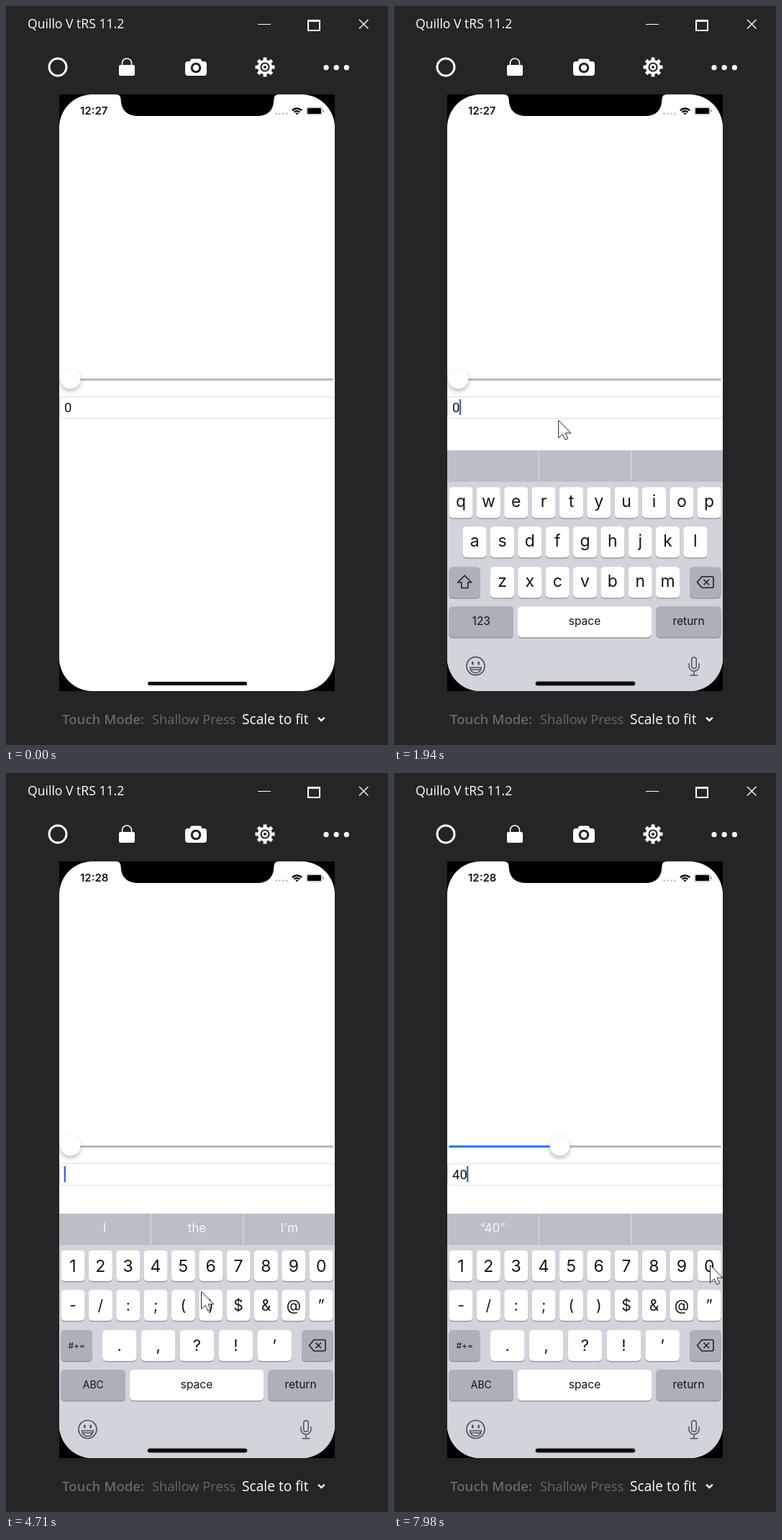
An HTML page with a canvas that plays this animation: 531x1028 px, repeating every 8 s.

```html
<!DOCTYPE html>
<html lang="en">
<head>
<meta charset="utf-8">
<title>Simulator</title>
<style>
html, body { margin: 0; width: 100%; height: 100%; overflow: hidden; background: #252525; }
canvas { display: block; }
</style>
</head>
<body>
<canvas id="stage" width="531" height="1028"></canvas>
<script>
const c = document.getElementById('stage').getContext('2d');
const LOOP = 8000, STEP = 77.3, KEYBOARD = 1594, DIGITS = 2940, DELETE = 4200, FOUR = 6610, ZERO = 7730;
const UI = '"Open Sans", sans-serif', PHONE = 'Inter, sans-serif', FIELD = 'Roboto, sans-serif';
const INK = '#151515', DARK = '#252525', GREY_KEY = '#abb0ba', ICON = '#50545a';
const PITCH = 38.35;

// Pointer moves: start, end, destination
const moves = [[245, 850, 234, 564], [1860, 2400, 123, 792], [2410, 2710, 120, 844],
  [3220, 3745, 432, 796], [4400, 4940, 184, 680], [5400, 5800, 221, 689], [6660, 7273, 439, 684]];

const clamp = u => Math.min(1, Math.max(0, u));
const smooth = u => (1 - Math.cos(Math.PI * clamp(u))) / 2;

const snap = t => 1630 + STEP * Math.floor((t - 1630) / STEP + 0.2);

function pointerAt(t) {
  let x = 435, y = 990;
  for (const [a, b, toX, toY] of moves) {
    const u = smooth((t - a) / (b - a));
    x += (toX - x) * u;
    y += (toY - y) * u;
  }
  return [x, y];
}

// Solid for a while after each touch, then blinking with soft fades
function caretAlpha(t) {
  if (t < KEYBOARD) return 0;
  const touch = [1250, DIGITS, DELETE, FOUR, ZERO].findLast(a => a <= t);
  const idle = t - touch - 800;
  if (idle < 0) return 1;
  const p = idle % 1020;
  return clamp(1 - p / 230) + clamp((p - 390) / 230);
}

function box(x, y, w, h, r, fill) {
  c.beginPath();
  c.roundRect(x, y, w, h, r);
  c.fillStyle = fill;
  c.fill();
}
function disc(x, y, r, fill) {
  c.beginPath();
  c.arc(x, y, r, 0, 7);
  c.fillStyle = fill;
  c.fill();
}
function stroke(width, color) {
  c.lineWidth = width;
  c.strokeStyle = color;
  c.stroke();
}
function ring(x, y, r, width, color) {
  c.beginPath();
  c.arc(x, y, r, 0, 7);
  stroke(width, color);
}
function draw(d, width, color) {
  c.lineWidth = width;
  c.strokeStyle = color;
  c.stroke(new Path2D(d));
}
function text(s, x, y, font, fill, align = 'left') {
  c.font = font;
  c.fillStyle = fill;
  c.textAlign = align;
  c.fillText(s, x, y);
}

function windowChrome() {
  c.fillStyle = DARK;
  c.fillRect(0, 0, 531, 1028);
  text('Quillo V tRS 11.2', 30, 31, '17.6px ' + UI, '#fff');
  draw('M350 25.5H368', 1, '#fff');
  draw('M491 19L503.5 31.5M503.5 19L491 31.5', 1.4, '#fff');
  draw('M420 20V34H436V20', 2, '#fff');
  draw('M419 20.5H437', 3, '#fff');

  ring(72, 85, 12, 3, '#fff');
  draw('M161.5 83V79.5A6.5 6.5 0 0 1 174.5 79.5V83', 1.6, '#fff');
  box(157, 82, 22, 15, 2, '#fff');
  box(249, 77, 30, 20, 4, '#fff');
  box(256, 73.5, 16, 8, 3, '#fff');
  disc(264, 86, 7.3, DARK);
  disc(264, 86, 4.2, '#fff');
  for (let i = 0; i < 8; i++) {
    c.save();
    c.translate(360, 85);
    c.rotate(i * Math.PI / 4);
    c.fillStyle = '#fff';
    c.fillRect(-2.4, -13.5, 4.8, 5);
    c.restore();
  }
  ring(360, 85, 8.4, 3.6, '#fff');
  ring(360, 85, 3.3, 2.4, '#fff');
  for (let i = 0; i < 3; i++) disc(445 + i * 14.2, 85.7, 3.6, '#fff');

  text('Touch Mode:', 78, 999, '600 18.6px ' + UI, '#686868');
  text('Shallow Press', 203, 999, '18.3px ' + UI, '#686868');
  text('Scale to fit', 328, 999, '19.2px ' + UI, '#fff');
  draw('M434 989.8L438.4 994L442.8 989.8', 2.4, '#fff');
}

function statusBar(t) {
  c.fillStyle = '#000';
  c.fill(new Path2D('M153 123Q159 123 159.5 129Q160 153 184 153H349Q372 153 372.5 129Q373 123 379 123Z'));
  text(t < 2090 ? '12:27' : '12:28', 103, 151, '600 15px ' + PHONE, INK);
  for (let i = 0; i < 4; i++) disc(375.5 + i * 4.9, 149.8, 1.5, '#c6c6c6');
  for (let r = 1.8; r < 10; r += 3.6) {
    c.beginPath();
    c.arc(404.5, 151.5, r, -Math.PI * 0.76, -Math.PI * 0.24);
    stroke(2.3, '#000');
  }
  box(417.5, 140.5, 22, 11, 3, '#b0b0b0');
  box(418.5, 141.5, 20, 9, 2, '#fff');
  box(419, 142, 19, 8, 1.5, '#000');
  box(440.3, 144, 1.6, 4, 1, '#999');
}

function slider(value) {
  const x = 89.5 + value * 3.525;
  box(76, 518.3, 379, 2.6, 1.3, '#b5b5b7');
  if (value) box(76, 518.3, x - 76, 2.6, 1.3, '#087aff');
  c.save();
  c.shadowColor = 'rgba(0,0,0,.28)';
  c.shadowBlur = 6;
  c.shadowOffsetY = 3;
  disc(x, 518.5, 14, '#fff');
  c.restore();
}

function field(value, caret) {
  c.beginPath();
  c.roundRect(74.5, 543.5, 383, 30, 5);
  stroke(1.2, '#dedede');
  text(value, 81, 564.5, '18.5px ' + FIELD, INK);
  c.globalAlpha = caret;
  c.fillStyle = '#4169d6';
  c.fillRect(80.6 + 10.2 * value.length, 547, 2.4, 22);
  c.globalAlpha = 1;
}

function key(x, y, w, label = '', size = 23, base = 28, fill = '#fff') {
  box(x, y + 1.3, w, 43, 5, '#8b8e95');
  box(x, y, w, 43, 5, fill);
  text(label, x + w / 2, y + base, size + 'px ' + PHONE, INK, 'center');
}
function keyRow(chars, x, y, base = 28, size = 23, w = 33, step = PITCH) {
  [...chars].forEach((ch, i) => key(x + i * step, y, w, ch, size, base));
}

function keyboard(top, digits, hints, deleting) {
  c.save();
  c.translate(0, top);
  c.fillStyle = '#d1d4db';
  c.fillRect(74, 0, 383, 345);
  c.fillStyle = '#babec7';
  c.fillRect(74, 0, 383, 43.5);
  c.fillStyle = '#d6d9de';
  for (const x of [200.8, 329.2]) c.fillRect(x, 0, 1.3, 43.5);
  hints.forEach((s, i) => text(s, 137 + i * 128.4, 25.5, '17px ' + PHONE, '#f6f7f9', 'center'));

  if (digits) {
    keyRow('1234567890', 76.5, 51, 30);
    keyRow('-/:;()$&@”', 76.5, 106, 28.5, 21);
    keyRow('.,?!’', 134, 162, 29, 22, 47.5, 53.85);
  } else {
    keyRow('qwertyuiop', 76.5, 51);
    keyRow('asdfghjkl', 95.6, 106);
    keyRow('zxcvbnm', 134, 162);
  }
  key(76.5, 162, 43.5, digits ? '#+=' : '', 12, 26, GREY_KEY);
  if (!digits) draw('M98.3 174L107.5 183.5H102.8V191.3H93.8V183.5H89Z', 1.6, '#222');
  key(76.5, 217, 89.5, digits ? 'ABC' : '123', digits ? 14 : 15.5, 26, GREY_KEY);
  key(411, 162, 43.5, '', 12, 26, deleting ? '#fff' : GREY_KEY);
  draw('M428 175.5H442Q444 175.5 444 177.5V189Q444 191 442 191H428L421.5 183.2ZM430.5 179.5L438 187M438 179.5L430.5 187', 1.6, '#222');
  key(172, 217, 186, 'space', 15.5, 26);
  key(364.5, 217, 90, 'return', 15.5, 26, GREY_KEY);

  ring(113.5, 300, 12.5, 1.7, ICON);
  for (const x of [109.3, 117.7]) box(x - 1.3, 293.5, 2.6, 5, 1.3, ICON);
  draw('M105.5 302H121.5Q120 309.5 113.5 309.5T105.5 302ZM107 305H120', 1.5, ICON);
  box(413, 287, 8, 17, 4, ICON);
  box(414.5, 288.5, 5, 14, 2.5, '#d1d4db');
  draw('M410 296V300A7 7 0 0 0 424 300V296M417 307V312.5M411.5 312.8H422.5', 1.5, ICON);
  c.restore();
}

// Enlarged bubble above a pressed key in the top row
function bubble(ch, column) {
  const x = 76.5 + column * PITCH, k = x + 33;
  const left = Math.min(x - 14.5, 394), right = left + 61;
  c.save();
  c.shadowColor = 'rgba(0,0,0,.3)';
  c.shadowBlur = 7;
  c.fillStyle = '#fff';
  c.fill(new Path2D(`M${left + 9} 602H${right - 9}Q${right} 602 ${right} 611V642
    C${right} 655 ${k} 654 ${k} 668V702Q${k} 707 ${k - 5} 707H${x + 5}Q${x} 707 ${x} 702V668
    C${x} 654 ${left} 655 ${left} 642V611Q${left} 602 ${left + 9} 602Z`));
  c.restore();
  text(ch, (left + right) / 2, 643, '36px ' + PHONE, INK, 'center');
}

function pointer(x, y) {
  const shape = new Path2D('M0 0V24.5L5.7 19.2L9.3 27L13 25.3L9.5 17.7H17.2Z');
  c.save();
  c.translate(x + 0.5, y + 0.5);
  c.fillStyle = '#fff';
  c.fill(shape);
  stroke.call(null, 1, '#222');
  c.stroke(shape);
  c.restore();
}

function frame(now) {
  const t = snap(now % LOOP);
  const value = t < DELETE ? '0' : t < FOUR ? '' : t < ZERO ? '4' : '40';
  const hints = t < DELETE + 2 * STEP ? [] : value ? [`“${value}”`] : ['I', 'the', "I'm"];

  windowChrome();
  c.fillStyle = '#000';
  c.fillRect(74, 123, 383, 830);
  c.save();
  c.beginPath();
  c.roundRect(74, 123, 383, 830, 46);
  c.clip();
  c.fillStyle = '#fff';
  c.fillRect(74, 123, 383, 830);
  statusBar(t);
  slider(+value);
  field(value, caretAlpha(t));
  if (t >= KEYBOARD) {
    const s = (t - KEYBOARD) * 0.0178;   // critically damped rise
    keyboard(613 + 340 * (1 + s) * Math.exp(-s), t >= DIGITS, hints, t >= DELETE - 40 && t < DELETE + 120);
  }
  if (t >= FOUR - 390 && t < FOUR + STEP) bubble('4', 3);
  if (t >= ZERO - 240 && t < ZERO + STEP) bubble('0', 9);
  box(197, 940, 138, 5, 2.5, '#0a0a0a');
  c.restore();
  if (t >= 300) pointer(...pointerAt(t));
}

const start = performance.now();
function tick() {
  frame(performance.now() - start);
  requestAnimationFrame(tick);
}
tick();
</script>
</body>
</html>
```
